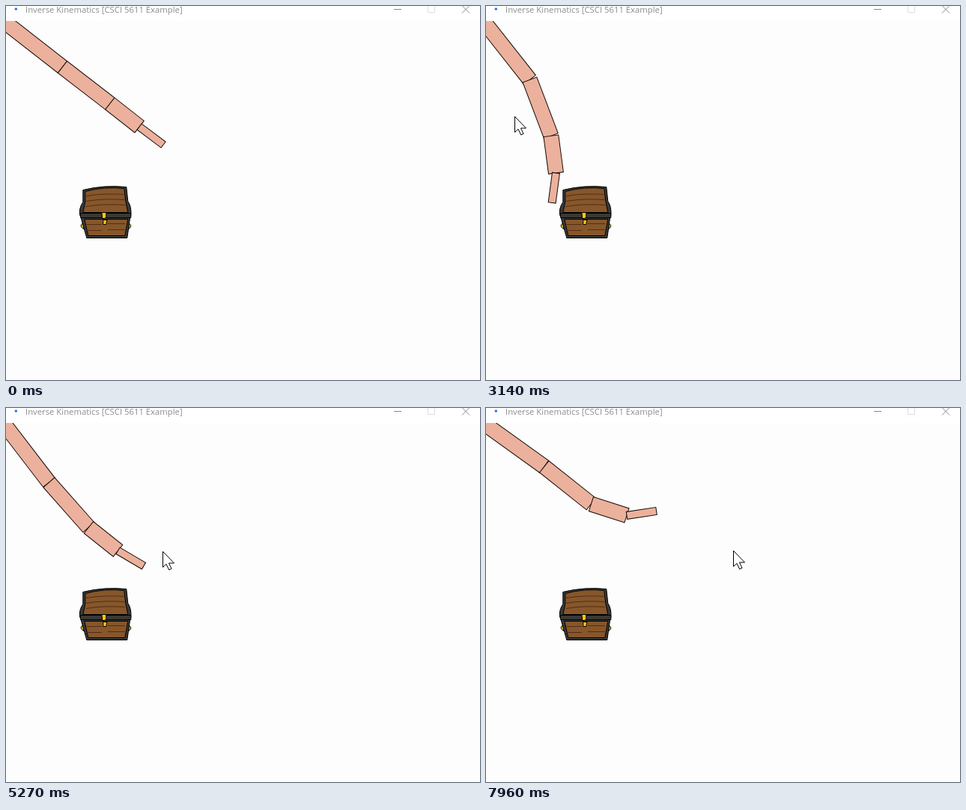
An HTML page with a canvas for the animation above (7990 ms loop, 633 px wide and 499 px high).

```html
<!DOCTYPE html>
<html lang="en">
<head>
<meta charset="utf-8">
<title>Inverse Kinematics</title>
<style>
html, body { margin: 0; width: 100%; height: 100%; overflow: hidden; background: #fff }
canvas { display: block }
</style>
</head>
<body>
<canvas id="stage" width="633" height="499"></canvas>
<script>
const LOOP = 7990, START = 330, TOP = 20;
const ctx = document.getElementById('stage').getContext('2d');

// length and width of each arm segment, root first
const SEGMENTS = [[100, 20], [80, 20], [50, 20], [40, 10]];

// time, pointer x and y, angle of each segment in degrees
const KEYS = [
  [START, 583, 457, 37.9, 37.6, 38.1, 36.9],
  [1140, 355, 461, 31.9, 40.9, 55.8, 55],
  [2060, 549, 183, 34, 34.6, 27.1, 4.2],
  [3140, 38, 147, 51.7, 69.2, 82.4, 97.5],
  [3850, 38, 150, 36, 63, 112, 158],
  [4610, 44, 364, 47.8, 76, 99.3, 122.7],
  [5350, 215, 170, 53, 45, 31, 19],
  [5930, 84, 61, 57.1, 20.7, -21.6, -62.8],
  [6600, 85, 61, 63, -8, -82, -155],
  [7960, 330, 190, 35.7, 38.4, 17.9, -8.5]
];

// speed of value j at key i; at rest at both ends
function slope(i, j) {
  const a = KEYS[i - 1], b = KEYS[i + 1];
  return a && b ? (b[j] - a[j]) / (b[0] - a[0]) : 0;
}

// smooth curve through the keys
function poseAt(time) {
  const t = Math.min(Math.max(time, START), KEYS.at(-1)[0]);
  const n = Math.max(1, KEYS.findIndex(k => k[0] >= t));
  const a = KEYS[n - 1], b = KEYS[n], span = b[0] - a[0];
  const u = (t - a[0]) / span, v = 1 - u;
  return a.map((_, j) =>
    a[j] * v * v * (1 + 2 * u) + b[j] * u * u * (1 + 2 * v) +
    span * u * v * (v * slope(n - 1, j) - u * slope(n, j)));
}

function shape(d, fill, stroke) {
  const path = new Path2D(d);
  if (fill) { ctx.fillStyle = fill; ctx.fill(path); }
  if (stroke) { ctx.strokeStyle = stroke; ctx.stroke(path); }
}

function drawWindow() {
  ctx.fillStyle = '#fff';
  ctx.fillRect(0, 0, 633, TOP);
  ctx.fillStyle = '#fdfdfd';
  ctx.fillRect(0, TOP, 633, 499 - TOP);
  ctx.fillStyle = '#1e78e6';
  ctx.beginPath();
  ctx.arc(13.3, 4, 1.8, 0, 7);
  ctx.fill();
  ctx.fillStyle = '#8c8c8c';
  ctx.font = '11.3px "Open Sans", "Noto Sans", sans-serif';
  ctx.fillText('Inverse Kinematics [CSCI 5611 Example]', 26, 9);
  shape('M518 4.5H528M609 -.5L619 9.5M619 -.5L609 9.5', null, '#888');
  shape('M563.5 -.5H572.5V8.5H563.5Z', null, '#ddd');
}

function drawChest() {
  const dark = '#393a36', brown = '#87562b', grain = '#4f3013', gold = '#f5c810';
  ctx.save();
  ctx.translate(.8, .5);
  shape('M102 289Q96 293 103 297ZM163 289Q169 293 163 297Z', gold, '#000');
  // box and lid
  shape('M99 281H165L161 309H107Z', dark, '#000');
  shape('M104 284H162L158 306H109Z', brown, '#000');
  shape('M102 245Q130 238 160 241L162 260Q167 267 166 279H98Q96 270 102 261Z', dark, '#000');
  shape('M105 247Q130 240 157 243L159 260L162 275H102L105 261Z', brown, '#000');
  for (let y = 253; y < 272; y += 7) shape(`M106 ${y}Q130 ${y - 4} 158 ${y - 2}`, null, grain);
  for (let y = 291; y < 305; y += 8) shape(`M107 ${y}H127M135 ${y - 1}H158`, null, grain);
  shape('M98 276H166V282H99Z', dark, '#000');
  // lock
  shape('M127 275H133V281L131 283H128ZM129 285H134L133 291H129Z', gold, '#000');
  ctx.restore();
}

function drawArm(angles) {
  ctx.save();
  ctx.beginPath();
  ctx.rect(0, TOP, 633, 499);
  ctx.clip();
  ctx.fillStyle = '#ecb19c';
  ctx.strokeStyle = '#140c08';
  ctx.translate(-3.5, TOP);
  let heading = 0;
  SEGMENTS.forEach(([length, width], i) => {
    const angle = angles[i] * Math.PI / 180;
    ctx.rotate(angle - heading);
    heading = angle;
    ctx.fillRect(0, -width / 2, length, width);
    ctx.strokeRect(0, -width / 2, length, width);
    ctx.translate(length, 0);
  });
  ctx.restore();
}

function drawPointer(x, y) {
  ctx.save();
  ctx.translate(Math.round(x) + .5, Math.round(y) + .5);
  shape('M0 0V21L4.5 16.8L8.2 24.5L11.6 23L8 15.5H15Z', '#fff', '#000');
  ctx.restore();
}

function frame(now) {
  const t = now % LOOP;
  const [, x, y, ...angles] = poseAt(t);
  drawWindow();
  drawChest();
  drawArm(angles);
  if (t >= START) drawPointer(x, y);
  requestAnimationFrame(frame);
}
requestAnimationFrame(frame);
</script>
</body>
</html>
```
